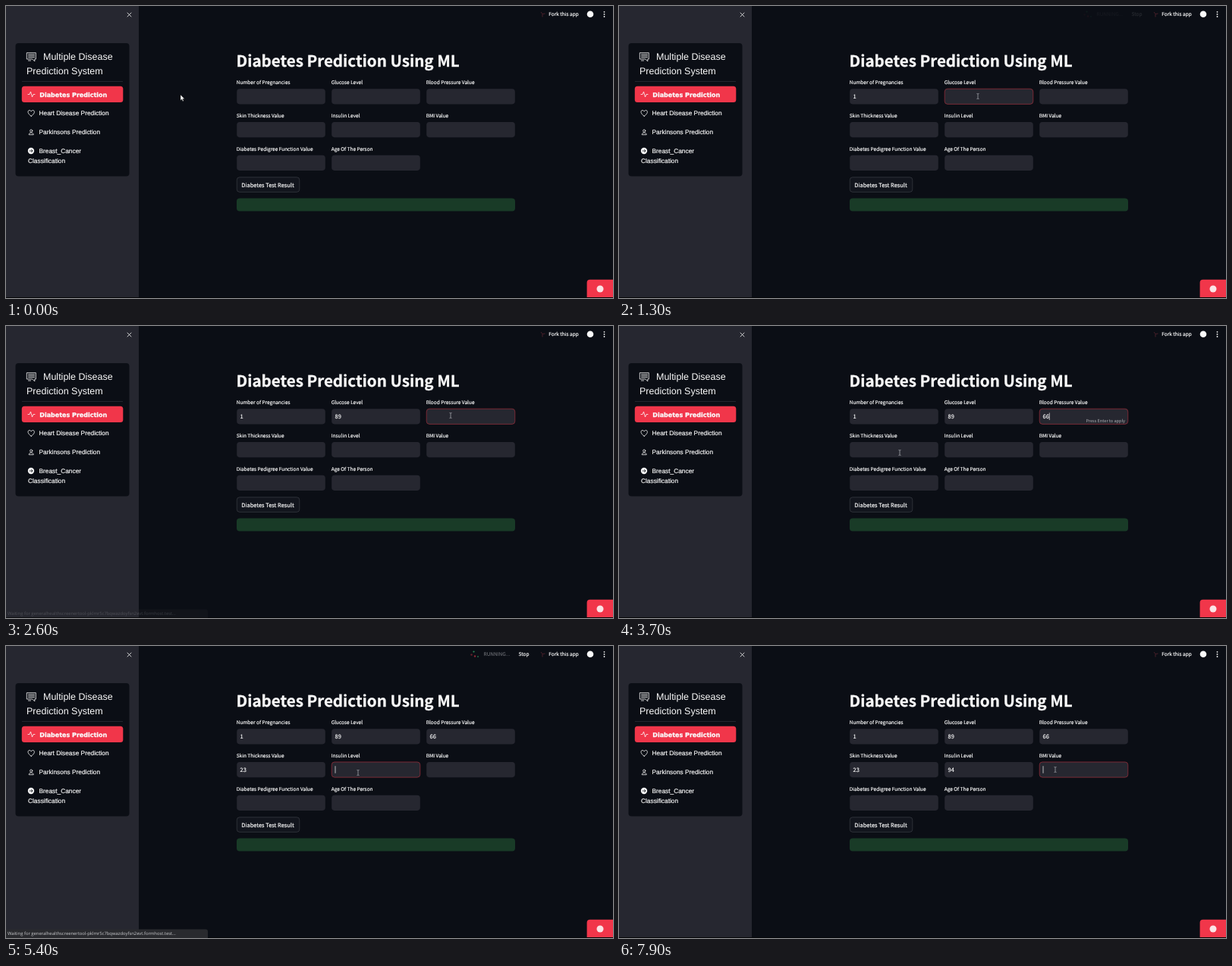
Animation, 800 px wide and 385 px high, one loop 8000 ms. Source, as an HTML page:

```html
<!DOCTYPE html>
<html lang="en">
<head>
<meta charset="utf-8">
<title>Prediction form</title>
<style>
html, body { margin: 0; width: 100%; height: 100%; overflow: hidden; background: #0b0e15; }
svg { display: block; width: 800px; height: 385px; text-rendering: geometricPrecision; }
text { fill: #fafafa; stroke: #fafafa; stroke-width: .18; font: 6.51px "Noto Sans CJK JP", "Noto Sans CJK SC", "Noto Sans CJK", "Open Sans", sans-serif; white-space: pre; }
.title { font-size: 20.55px; font-weight: 700; stroke-width: .3; }
.body { font-size: 7.44px; }
.hint { font-size: 5.58px; fill: #b0b1b6; stroke: none; }
.dim { fill: #7d7f85; stroke: none; }
.side { font: 8.33px "Liberation Sans", Arial, sans-serif; }
.head { font: 12.5px "Liberation Sans", Arial, sans-serif; stroke: none; }
.active { font: bold 8px "DejaVu Sans", sans-serif; stroke-width: .3; }
.status { font: 5.86px "Open Sans", sans-serif; fill: #c9cacd; stroke: none; }
.line { fill: none; stroke: #fafafa; stroke-width: .8; stroke-linecap: round; stroke-linejoin: round; }
</style>
</head>
<body>
<svg viewBox="0 0 800 385">
  <rect width="800" height="385" fill="#0b0e15"/>
  <rect width="175" height="385" fill="#262730"/>

  <!-- sidebar -->
  <path class="line" d="M160 9l5 5m0-5l-5 5" stroke-width="1"/>
  <rect x="12.5" y="49" width="150" height="175.5" rx="4" fill="#0b0e15"/>
  <path class="line" d="M27.700 61.700h11.600v8.300h-1.500v3l-3-3h-7.100zM29.500 63.800h8m-8 2h8m-8 2h8M29.500 72h3"/>
  <text class="head" x="49" y="71.300">Multiple Disease</text>
  <text class="head" x="27" y="90">Prediction System</text>
  <path d="M21 99.500h133" stroke="#30323a" stroke-width=".7"/>
  <rect x="20.800" y="105.700" width="133.500" height="21.300" rx="3.500" fill="#f1364a"/>
  <path class="line" d="M29 116.500h2l1.500-3.500 2 7 1.500-3.500h2"/>
  <text class="active" x="44.300" y="119.500">Diabetes Prediction</text>
  <path class="line" d="M33.200 145.200c-6-4-4.500-7.700-2.200-7.700 1.200 0 2 .8 2.200 1.600.2-.8 1-1.600 2.200-1.600 2.300 0 3.800 3.700-2.200 7.700z"/>
  <text class="side" x="43.500" y="144.200">Heart Disease Prediction</text>
  <circle class="line" cx="33.200" cy="164.600" r="1.600"/>
  <path class="line" d="M30.200 169.300c0-3.200 6-3.200 6 0z"/>
  <text class="side" x="43.500" y="169.200">Parkinsons Prediction</text>
  <circle cx="33" cy="191" r="4.200" fill="#fafafa"/>
  <path class="line" d="M31 191h4m-1.500-1.500l1.500 1.500-1.500 1.500" style="stroke:#0b0e15"/>
  <text class="side" x="43.500" y="194.200">Breast_Cancer</text>
  <text class="side" x="29" y="206.500">Classification</text>

  <!-- toolbar -->
  <g id="running">
    <circle cx="616.500" cy="7.500" r="1.100" fill="#2f8a58"/>
    <circle cx="613.500" cy="11.500" r="1.200" fill="#63222c"/>
    <circle cx="618" cy="13.500" r="1.200" fill="#8c2936"/>
    <circle cx="622" cy="14" r="1" fill="#226644"/>
    <text class="dim" x="629.500" y="13">RUNNING...</text>
    <text x="675.500" y="13">Stop</text>
  </g>
  <path d="M705 8l2 2.500 3.500-.5M707 10.500v4" fill="none" stroke="#48202a" stroke-width="1"/>
  <text x="715.300" y="13">Fork this app</text>
  <circle cx="770" cy="10.800" r="4.300" fill="#fafafa"/>
  <g fill="#fafafa">
    <circle cx="788.500" cy="7.800" r=".9"/><circle cx="788.500" cy="10.900" r=".9"/><circle cx="788.500" cy="14" r=".9"/>
  </g>

  <!-- form -->
  <text class="title" x="303.500" y="80">Diabetes Prediction Using ML</text>
  <g id="form"></g>
  <rect x="304.300" y="225.800" width="82.500" height="19.500" rx="3.500" fill="#12151d" stroke="#3b3e46" stroke-width=".7"/>
  <text class="body" x="310.300" y="238.600">Diabetes Test Result</text>
  <rect x="304" y="253.500" width="367" height="17" rx="4" fill="#193b27"/>

  <path d="M765.600 384v-19.200q0-4 4-4h30.400v23.200z" fill="#f1364a"/>
  <circle cx="783" cy="373" r="4.500" fill="#fbe4e6"/>
  <rect y="384" width="800" height="1" fill="#050608"/>

  <g id="status">
    <path d="M0 373.500h263q3 0 3 3v8.500h-266z" fill="#292a2e"/>
    <text class="status" x="2" y="381.300">Waiting for generalhealthscreenertool-pklmr5c7bqwazdoyfsn2evt.formhost.test...</text>
  </g>
  <path id="caret" d="M0 0v9.500" stroke="#fafafa" stroke-width=".7"/>
  <path id="arrow" d="M0 0v7.500l1.700-1.600 1.300 2.800 1.200-.6-1.300-2.600h2.400z" fill="#fff" stroke="#111" stroke-width=".4"/>
  <path id="beam" d="M-1.500-3.500q1.500 0 1.500.8q0-.8 1.500-.8M0-2.700v5.400M-1.500 3.500q1.500 0 1.500-.8q0 .8 1.500 .8" fill="none" stroke="#b4b5ba" stroke-width=".7"/>
</svg>
<script>
const LOOP = 8000, STEP = 100, W = 117, H = 20.6;
const $ = id => document.getElementById(id);
const labels = ['Number of Pregnancies', 'Glucose Level', 'Blood Pressure Value', 'Skin Thickness Value',
  'Insulin Level', 'BMI Value', 'Diabetes Pedigree Function Value', 'Age Of The Person'];

// One entry per visited field: focus time, text and the time of each keystroke.
const visits = [
  { at: 300, text: '1', keys: [500] },
  { at: 800, text: '89', keys: [1600, 1800] },
  { at: 2050, text: '66', keys: [3000, 3300] },
  { at: 3950, text: '23', keys: [4600, 4800] },
  { at: 5050, text: '94', keys: [6100, 6300] },
  { at: 6900, text: '', keys: [] }
];

// Pointer path: time, x, y
const path = [[0, 230, 117], [300, 345, 118], [600, 350, 118], [800, 470, 119], [1300, 473, 119], [1850, 473, 119],
  [2050, 584, 118], [2600, 586, 118], [3300, 586, 119], [3700, 370, 167], [4850, 370, 167], [5050, 462, 167],
  [5400, 464, 167], [6400, 466, 167], [6800, 566, 156], [6900, 574, 162], [7900, 575, 163], [8000, 575, 163]];

function add(tag, attrs, text = '') {
  const el = document.createElementNS('http://www.w3.org/2000/svg', tag);
  for (const k in attrs) el.setAttribute(k, attrs[k]);
  el.textContent = text;
  return $('form').appendChild(el);
}

const fields = labels.map((label, i) => {
  const x = 304 + 125 * (i % 3), y = 109 + 43.75 * Math.floor(i / 3);
  add('text', { x: x - .3, y: y - 6 }, label);
  return {
    x, y,
    box: add('rect', { x: x + .2, y: y + .2, width: W - .4, height: H - .4, rx: 3.8, fill: '#262730', 'stroke-width': .55 }),
    value: add('text', { class: 'body', x: x + 4.5, y: y + 13.1 }),
    hint: add('text', { class: 'hint', x: x + W - 4, y: y + 18, 'text-anchor': 'end' }, 'Press Enter to apply')
  };
});

const clamp = v => Math.max(0, Math.min(1, v));
const place = (el, x, y) => el.setAttribute('transform', `translate(${x} ${y})`);
const show = (el, on) => el.setAttribute('opacity', +on);

function pointerAt(t) {
  const n = path.findIndex(p => p[0] > t);
  const [t0, x0, y0] = path[n - 1], [t1, x1, y1] = path[n];
  const u = (t - t0) / (t1 - t0), e = u * u * (3 - 2 * u);
  return [x0 + (x1 - x0) * e, y0 + (y1 - y0) * e];
}

function draw(t) {
  const active = visits.filter(v => v.at <= t).length - 1;
  fields.forEach((f, i) => {
    const v = visits[i], typed = v ? v.keys.filter(k => k <= t).length : 0;
    f.value.textContent = v ? v.text.slice(0, typed) : '';
    f.box.setAttribute('stroke', i === active ? '#c43442' : 'none');
    show(f.hint, i === active && typed > 0);
  });

  const visit = visits[active];
  show($('caret'), false);
  if (visit) {
    const f = fields[active];
    const last = Math.max(visit.at, ...visit.keys.filter(k => k <= t));
    place($('caret'), f.x + 5 + f.value.getComputedTextLength(), f.y + 5.5);
    show($('caret'), (t - last) % 1000 < 500);
  }

  // Leaving a field sends its value and reruns the page.
  const since = active > 0 ? t - visit.at : 0;
  show($('running'), since >= 200 ? clamp((510 - since) / 90) : 0);
  show($('status'), active > 1 && since >= 200 ? clamp((580 - since) / 130) : 0);

  const [x, y] = pointerAt(t);
  const over = fields.some(f => x > f.x && x < f.x + W && y > f.y && y < f.y + H);
  place($('arrow'), x, y);
  place($('beam'), x, y);
  show($('arrow'), !over);
  show($('beam'), over);
}

const start = performance.now();
function frame() {
  const t = (performance.now() - start) % LOOP;
  draw(Math.floor(t / STEP) * STEP);
  requestAnimationFrame(frame);
}
frame();
</script>
</body>
</html>
```
